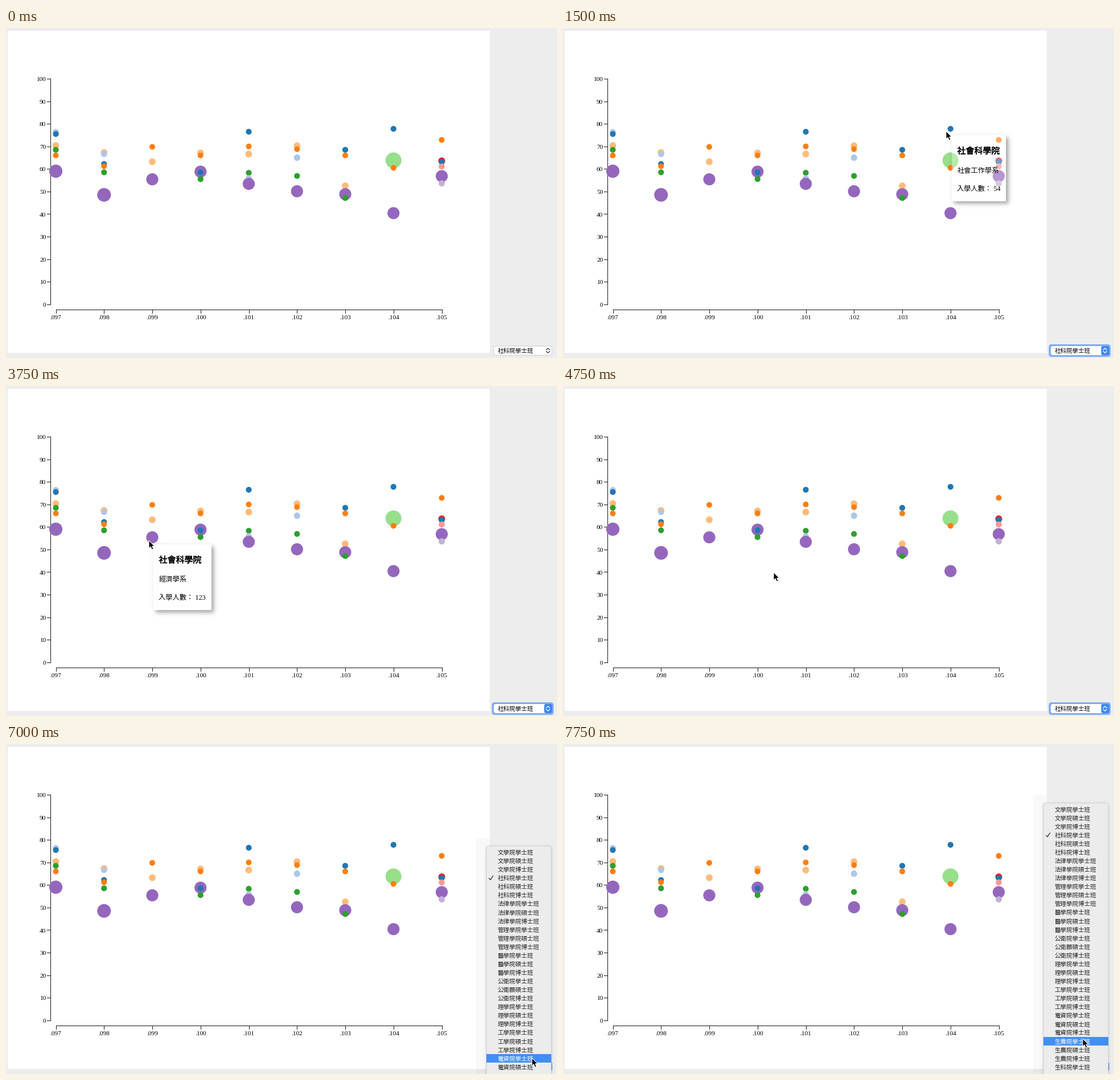
A matplotlib script for the animation above (8000 ms loop, 968x579 px).

```python
import itertools

import matplotlib.pyplot as plt
import numpy as np
from matplotlib.animation import FuncAnimation
from matplotlib.lines import Line2D
from matplotlib.patches import Circle, FancyBboxPatch, Polygon, Rectangle
from matplotlib.patheffects import withStroke

W, H = 968, 579
DPI = 64  # a power of two keeps the pixel size exact
PT = 72 / DPI
STEPS, STEP_MS = 32, 250

CJK = "Noto Sans CJK JP"
SERIF = ["Liberation Serif", CJK]

# department key: colour, usual radius
DEPTS = {
    "B": ("#1f77b4", 5.1), "b": ("#aec7e8", 5.3),
    "O": ("#ff7f0e", 5.0), "o": ("#ffbb78", 5.9),
    "G": ("#2ca02c", 5.1), "g": ("#98df8a", 14),
    "R": ("#d62728", 6.0), "r": ("#ff9896", 5.3),
    "P": ("#9467bd", 10.6), "p": ("#c5b0d5", 5.5),
}

# year: departments in drawing order, with their scores
SCORES = {
    "097": ("bBoGOP", [76.4, 75.5, 70.4, 68.5, 66, 59]),
    "098": ("obBOGP", [67.3, 66.6, 62.2, 61.2, 58.5, 48.5]),
    "099": ("OoP", [69.8, 63.2, 55.4]),
    "100": ("oOPBG", [67.1, 66, 58.8, 58.5, 55.5]),
    "101": ("BOoGbP", [76.5, 70, 66.6, 58.3, 55.9, 53.4]),
    "102": ("oOBbGP", [70.3, 68.8, 65, 64.9, 56.9, 50.1]),
    "103": ("BOoPG", [68.5, 66, 52.5, 48.8, 47.1]),
    "104": ("BgOP", [77.8, 63.8, 60.5, 40.4]),
    "105": ("ORBrPp", [72.9, 63.6, 63, 61.1, 56.8, 53.6]),
}
BIG = {("097", "P"): 11.6, ("098", "P"): 12}

COLLEGES = ["文學院", "社科院", "法律學院", "管理學院", "醫學院", "公衛院",
            "理學院", "工學院", "電資院", "生農院", "生科院"]
ITEMS = [c + d for c in COLLEGES for d in ("學士班", "碩士班", "博士班")]
ITEMS[16] = "公衛願碩士班"
CHOSEN = 3
ROW = 15.07
X_AXIS = 493.5

# pointer: step, x, y
PATH = np.array([
    (1, 850, 440), (2, 700, 104), (3, 682, 190), (4, 682, 190),
    (5, 673, 181), (9, 673, 181), (13, 252.5, 272), (14, 252.5, 272),
    (15, 251, 271), (17, 251, 271), (18, 262, 284), (19, 370, 327),
    (22, 862, 525), (24, 944, 561), (25, 944, 561), (27, 938, 573),
    (28, 924, 551), (29, 921, 566), (30, 917, 540), (31, 913, 517),
])
ARROW = np.array([(0, 0), (0, 13.8), (3.2, 10.9), (5.5, 16.2),
                  (8, 15.1), (5.8, 10), (10, 10)])

fig = plt.figure(figsize=(W / DPI, H / DPI), dpi=DPI, facecolor="#ededed")
ax = fig.add_axes([0, 0, 1, 1])
layer = itertools.count()


def add(artist):
    artist.set_zorder(next(layer))
    ax.add_artist(artist)
    return artist


def rect(x0, y0, x1, y1, color, alpha=1):
    add(Rectangle((x0, y0), x1 - x0, y1 - y0, fc=color, ec="none", alpha=alpha))


def rounded(x0, y0, x1, y1, r, fc, ec="none", lw=1.0, alpha=1):
    add(FancyBboxPatch((x0, y0), x1 - x0, y1 - y0, fc=fc, ec=ec, lw=lw * PT,
                       alpha=alpha,
                       boxstyle=f"round,pad=0,rounding_size={r}"))


def line(xs, ys, color="#2b2b2b", lw=1.13):
    add(Line2D(xs, ys, color=color, lw=lw * PT))


def text(x, cy, s, size, font=CJK, color="black", ha="left", rise=0.38,
         bold=0, alpha=1):
    """Place text so that its glyphs are centred on height cy."""
    t = ax.text(x, cy + rise * size, s, fontsize=size * PT, family=font,
                color=color, ha=ha, va="baseline", alpha=alpha,
                zorder=next(layer))
    if bold:
        t.set_path_effects([withStroke(linewidth=bold * PT, foreground=color,
                                       alpha=alpha)])


def score_y(v):
    return 484.6 - 3.955 * v


def chart():
    rect(3, 5, 850, 569.5, "white")
    line([78, 78], [score_y(100), score_y(0)])
    for v in range(0, 101, 10):
        y = score_y(v)
        line([72, 78], [y, y])
        text(70.2, y + 0.4, str(v), 11.4, SERIF, ha="right", rise=0.33)
    line([87.5, 765.5], [X_AXIS, X_AXIS])
    for k, (year, (keys, scores)) in enumerate(SCORES.items()):
        x = 87.5 + 84.75 * k
        line([x, x], [X_AXIS, X_AXIS + 6.5])
        text(x, 507.6, "." + year, 11.4, SERIF, ha="center", rise=0.33)
        for key, v in zip(keys, scores):
            color, r = DEPTS[key]
            add(Circle((x, score_y(v)), BIG.get((year, key), r),
                       fc=color, ec="none"))


def select(focused, ring):
    if ring:
        rounded(853.5, 555, 962, 577, 5, "#7fabf0")
    rounded(857, 558, 959, 574, 3.5, "white",
            "none" if focused else "#c4c4c4", 0.8)
    if focused:
        rounded(945.5, 558, 959.5, 574, 3, "#3b87f6")
    mark = "white" if focused else "#333333"
    for tip, base in ((561.8, 564.6), (570.2, 567.4)):
        line([949.3, 952.2, 955.1], [base, tip, base], mark, 1.3)
    text(863.5, 565.6, ITEMS[CHOSEN], 10.5)


def shadow(x0, y0, x1, y1, dx, dy, soft, strength, alpha=1):
    """Soft drop shadow, left open inside the box itself."""
    m = 24
    ex, ey = int(x0) - m, int(y0) - m
    nx, ny = int(x1 - x0) + 2 * m, int(y1 - y0) + 2 * m
    xs = ex + np.arange(nx) + 0.5
    ys = ey + np.arange(ny) + 0.5

    def band(p, a, b):
        return (np.tanh((p - a) / soft) - np.tanh((p - b) / soft)) / 2

    a = np.outer(band(ys, y0 + dy, y1 + dy), band(xs, x0 + dx, x1 + dx))
    inside = np.outer((ys > y0) & (ys < y1), (xs > x0) & (xs < x1))
    img = np.zeros((ny, nx, 4))
    img[..., 3] = np.where(inside, 0, a * strength * alpha)
    ax.imshow(img, extent=(ex, ex + nx, ey + ny, ey), aspect="auto",
              interpolation="nearest", zorder=next(layer))


def tooltip(x, y, width, dept, count, alpha):
    shadow(x, y, x + width, y + 116, 4, 4, 4.5, 0.36, alpha)
    rounded(x, y, x + width, y + 116, 5, "white", alpha=0.32 * alpha)
    text(x + 9.5, y + 27, "社會科學院", 15, bold=0.5, alpha=alpha)
    text(x + 9.5, y + 61, dept, 12.2, alpha=alpha)
    text(x + 9.5, y + 93, f"入學人數： {count}", 12.2, SERIF, alpha=alpha)


def menu(scroll, pointer_y):
    first = 521.4 - ROW * scroll
    top = first - 11
    hover = round((pointer_y - first) / ROW)
    rect(826, top - 14, 850, H, "black", 0.024)
    shadow(844, top, 958, H + 40, 0, 2, 3.5, 0.18)
    rounded(844, top, 958, H + 40, 5, "#ececec", "#c6c6c6", 0.7)
    for i, item in enumerate(ITEMS):
        y = first + ROW * i
        if y > H - 5:
            break
        if i == hover:
            rect(844, y - 7.7, 958, y + 7.3, "#408ff7")
        color = "white" if i == hover else "#222222"
        text(863.5, y, item, 10.5, color=color)
        if i == CHOSEN:
            line([848.7, 851, 855.5], [y + 0.6, y + 3.2, y - 3.6], color, 1.2)


def fade(i, start, full, end):
    """Half strength on the way in and out, full between."""
    if full <= i < end:
        return 1
    return 0.5 if start <= i < full or i == end else 0


def draw(i):
    global layer
    layer = itertools.count()
    ax.clear()
    ax.axis("off")
    menu_open = i >= 25
    chart()
    select(focused=i > 0, ring=i > 0 and not menu_open)

    a = fade(i, 5, 6, 10)
    if a:
        tooltip(683, 188, 95.5, "社會工作學系", 54, a)
    a = fade(i, 13, 14, 18)
    if a:
        tooltip(259, 277.5, 102, "經濟學系", 123, a)

    x, y = (np.interp(i, PATH[:, 0], PATH[:, k]) for k in (1, 2))
    if menu_open:
        menu({28: 22, 29: 24}.get(i, 0 if i < 28 else 27), y)
    if i > 0:
        add(Polygon(ARROW + (x, y), fc="black", ec="white", lw=1.0 * PT,
                    joinstyle="round"))
    ax.set_xlim(0, W)
    ax.set_ylim(H, 0)
    return []


anim = FuncAnimation(fig, draw, frames=STEPS, interval=STEP_MS,
                     init_func=lambda: [], repeat=True, repeat_delay=0)
plt.show()
```
